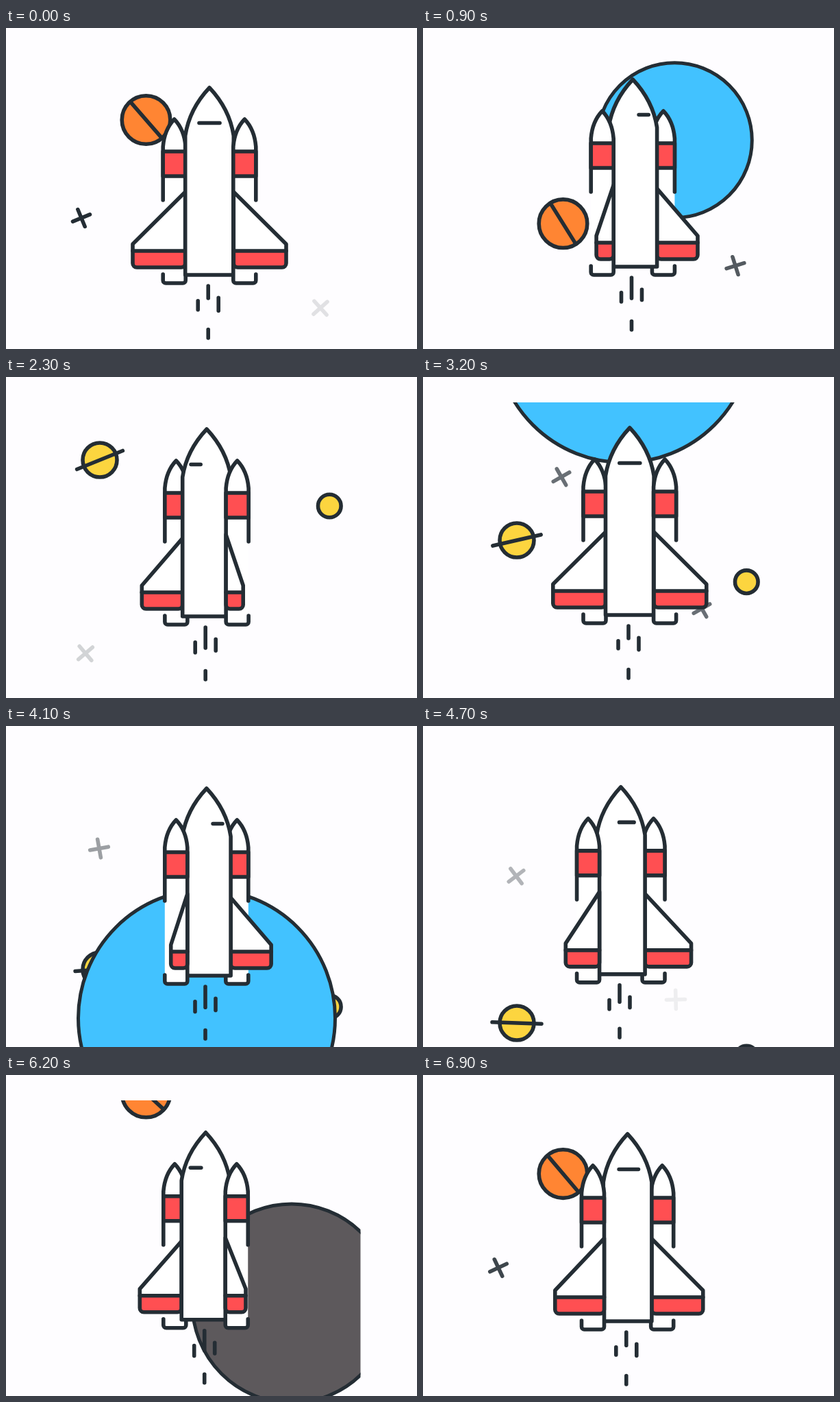
Animation, 600 px wide and 468 px high, one loop 7000 ms. Source, as an HTML page with a canvas:

```html
<!DOCTYPE html>
<html lang="en">
<head>
<meta charset="utf-8">
<title>Space shuttle</title>
<style>
  html, body { margin: 0; width: 100%; height: 100%; overflow: hidden; background: #fefdff; }
  canvas { display: block; }
</style>
</head>
<body>
<canvas id="stage" width="600" height="468"></canvas>
<script>
const ctx = document.getElementById('stage').getContext('2d');
const LOOP = 7000, STEP = 100, CYCLE = 6840, SWING = 3200;
const INK = '#242d34', RED = '#ff4f52', BLUE = '#42c2ff', YELLOW = '#fcd53f';
const RAD = Math.PI / 180;

// Each planet passes (x, y) at the time "at"; speed is in px/ms
const planets = [
  { x: 204.5, y: 134, at: 0, r: 35.3, speed: 0.168, fill: '#ff8533', bar: 35, angle: 49 },
  { x: 137, y: 121, at: 2300, r: 25, speed: 0.13, fill: YELLOW, bar: 36, angle: -22 },
  { x: 472.3, y: 188, at: 2300, r: 16.8, speed: 0.123, fill: YELLOW },
  { x: 367.3, y: 163.7, at: 900, r: 113, speed: 0.36, fill: BLUE },
  { x: 293, y: -62.7, at: 3200, r: 187.5, speed: 0.543, fill: BLUE },
  { x: 417, y: 11, at: 5500, r: 145, speed: 0.46, fill: '#5d595c' }
];

// x, y and time of full opacity
const crosses = [
  [110, 277, 0], [456, 354, 1010], [116, 376, 1900], [202, 135, 3040], [407, 327, 3040],
  [136, 197, 4375], [369, 430, 5165], [174, 114, 5525], [459, 379, 6405]
];

// Key points of the drift: time, x, bottom y
const drift = [
  [0, 297, 360], [900, 306.3, 348], [2300, 293, 349], [3200, 301.8, 347],
  [4100, 292.8, 364], [5500, 286.7, 356], [6900, 298.6, 359]
];

// Signed time to the nearest occurrence of a moment in the cycle
const since = (t, moment) => (t - moment + 1.5 * CYCLE) % CYCLE - CYCLE / 2;

// Smooth curve through the key points
function driftAt(t) {
  let i = 0;
  while (i < drift.length - 2 && t >= drift[i + 1][0]) i++;
  const a = drift[i], b = drift[i + 1], before = drift[i - 1] || a, after = drift[i + 2] || b;
  const span = b[0] - a[0], k = (t - a[0]) / span;
  return [1, 2].map(n => {
    const m0 = (b[n] - before[n]) / (b[0] - before[0]) * span;
    const m1 = (after[n] - a[n]) / (after[0] - a[0]) * span;
    const d = b[n] - a[n];
    return a[n] + k * (m0 + k * (3 * d - 2 * m0 - m1 + k * (m0 + m1 - 2 * d)));
  });
}

// The shuttle swings right and left twice per cycle
function turnAt(t) {
  const phase = t < SWING ? t / SWING : (t - SWING) / (CYCLE - SWING);
  return 16.2 * Math.sin(2 * Math.PI * phase);
}

function line(x1, y1, x2, y2) {
  ctx.beginPath();
  ctx.moveTo(x1, y1);
  ctx.lineTo(x2, y2);
  ctx.stroke();
}

function paint(shape, fill) {
  ctx.fillStyle = fill;
  ctx.fill(shape);
  ctx.stroke(shape);
}

function drawPlanet({ x, y, at, r, speed, fill, bar, angle }, t) {
  const d = since(t, at), disc = new Path2D();
  disc.arc(0, 0, r, 0, 7);
  ctx.save();
  ctx.translate(x, y + speed * d);
  if (r > 100) ctx.lineWidth = 5;
  paint(disc, fill);
  if (bar) {
    ctx.rotate((angle + 0.01 * d) * RAD);
    line(-bar, 0, bar, 0);
  }
  ctx.restore();
}

function drawCross([x, y, at], t) {
  const k = since(t, at) / 1000;
  if (Math.abs(k) >= 0.49) return;
  ctx.save();
  ctx.globalAlpha = 1 - 2 * Math.abs(k);
  ctx.translate(x, y + 67 * k);
  ctx.rotate(-45 * (k + 0.5) * RAD);
  ctx.stroke(new Path2D('M-13.5 0H13.5M0-13.5V13.5'));
  ctx.restore();
}

// side is -1 for left and 1 for right
function drawBooster(side, outer, inner) {
  const tip = (outer + inner) / 2, shape = new Path2D();
  shape.moveTo(outer, -109);
  shape.lineTo(outer, -187);
  shape.quadraticCurveTo(outer - side * 2, -212, tip, -227);
  shape.quadraticCurveTo(inner + side * 2, -212, inner, -187);
  shape.lineTo(inner, 8);
  shape.arcTo(inner, 12, outer, 12, 4);
  shape.arcTo(outer, 12, outer, -1, 4);
  shape.lineTo(outer, -1);
  paint(shape, '#fff');
  const band = new Path2D();
  band.rect(inner, -180, outer - inner, 36);
  paint(band, RED);
}

function drawWing(root, end, top) {
  const shape = new Path2D();
  shape.moveTo(root, top);
  shape.lineTo(end, -45);
  shape.arcTo(end, -11, root, -11, 6);
  shape.arcTo(root, -11, root, top, 6);
  shape.closePath();
  ctx.save();
  ctx.fillStyle = '#fff';
  ctx.fill(shape);
  ctx.clip(shape);
  ctx.fillStyle = RED;
  ctx.fillRect(-150, -35, 300, 30);
  ctx.restore();
  line(root, -35, end, -35);
  ctx.stroke(shape);
}

function drawSide(side, turn) {
  const away = Math.abs(turn), near = side * turn < 0;
  const outer = 67.8 - 0.42 * away, inner = outer - 33;
  const span = 112 - (near ? 3.7 : 1.09) * away;
  const top = -121 + (near ? 0.12 : 0.45) * away;
  drawBooster(side, side * outer, side * inner);
  drawWing(side * (near ? inner : 35.3), side * span, top);
}

function drawShuttle(t) {
  const [x, y] = driftAt(t), turn = turnAt(t), away = Math.abs(turn);
  const nearSide = turn > 0 ? -1 : 1;
  ctx.save();
  ctx.translate(x, y);

  // The near side overlaps the body
  drawSide(-nearSide, turn);
  paint(new Path2D('M-35.3 0V-203Q-29.3-242 0-273Q29.3-242 35.3-203V0Z'), '#fff');
  drawSide(nearSide, turn);

  const pane = 15 - 0.5 * away;
  line(turn - pane, -221.5, turn + pane, -221.5);

  const flame = (fx, fy, length) => line(fx - 1.8, fy, fx - 1.8, fy + length);
  const flicker = seed => 2 * Math.sin(t / 300 + seed);
  flame(0, 16, 18 + 0.75 * away);
  flame(-15, 37.7, 13 + flicker(0));
  flame(15, 33.4, 17 + flicker(2));
  flame(0, 79.5, 12.5);
  ctx.restore();
}

function draw(now) {
  const t = Math.floor(now % LOOP / STEP) * STEP;
  ctx.fillStyle = '#fefdff';
  ctx.fillRect(0, 0, 600, 468);
  ctx.save();
  ctx.beginPath();
  ctx.rect(83, 37, 434.5, 431);
  ctx.clip();
  ctx.strokeStyle = INK;
  ctx.lineWidth = 5.6;
  ctx.lineCap = ctx.lineJoin = 'round';
  crosses.forEach(c => drawCross(c, t));
  planets.forEach(p => drawPlanet(p, t));
  drawShuttle(t);
  ctx.restore();
}

const start = performance.now();
function tick() {
  draw(performance.now() - start);
  requestAnimationFrame(tick);
}
tick();
</script>
</body>
</html>
```
